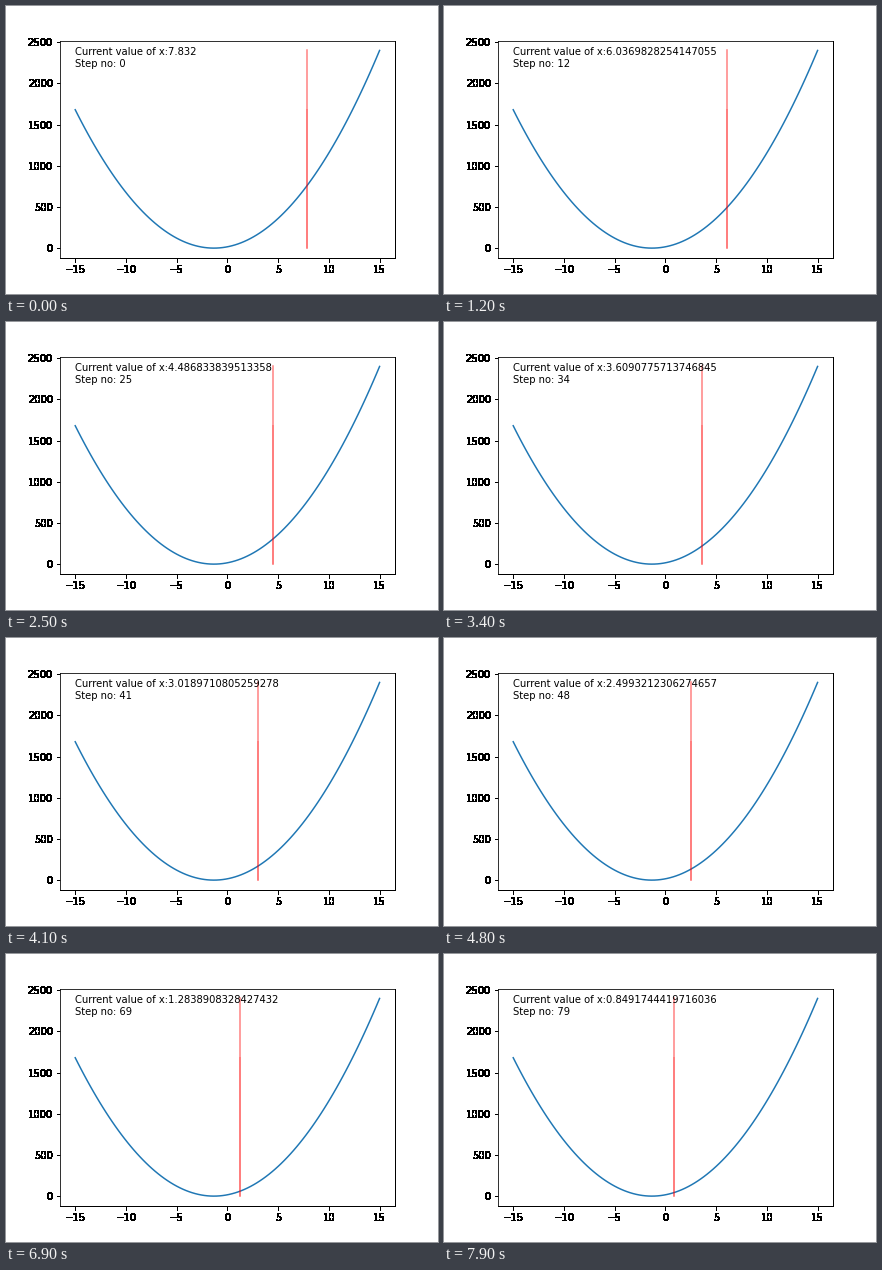
These frames come from a looping animation (432x288 px, 8 s). A matplotlib script:

```python
import matplotlib.pyplot as plt
import numpy as np
from matplotlib.animation import FuncAnimation

STEPS = 80
RATE = 0.001


def cost(x):
    return 9 * x**2 + 24 * x + 16


def slope(x):
    return 18 * x + 24


def descend(x, steps):
    path = [x]
    for _ in range(steps - 1):
        x = x - RATE * slope(x)
        path.append(x)
    return path


def harden(img, dpi):
    """Make every touched pixel opaque, so text outside the plot has hard edges."""
    img = np.rint(img * 255).astype(np.uint8)
    img[..., 3] = np.where(img[..., 3] > 0, 255, 0)
    return img, 0, 0


plt.rcParams.update({"font.family": "DejaVu Sans", "font.size": 10})
fig = plt.figure(figsize=(6, 4), dpi=72, facecolor="white")
fig.subplots_adjust(left=0.125, right=0.9, bottom=0.125, top=0.88)
ax = fig.add_subplot()
ax.set_agg_filter(harden)

xs = np.linspace(-15, 15, 100)
ys = cost(xs)
ax.plot(xs, ys)
ax.set_xticks(range(-15, 16, 5))
ax.set_yticks(range(0, 2501, 500))
ax.set_xlim(-16.5, 16.5)
ax.set_ylim(-120.05, 2521.05)

# The marker runs down and back up through the curve's heights.
marker, = ax.plot(np.full_like(xs, 0), ys, color="red", alpha=0.5)
label = ax.text(-15, 2200, "")
values = descend(7.832, STEPS)


def update(step):
    x = values[step]
    marker.set_xdata(np.full_like(xs, x))
    label.set_text(f"Current value of x:{x}\nStep no: {step}")
    return marker, label


anim = FuncAnimation(fig, update, frames=STEPS, interval=100,
                     repeat=True, repeat_delay=0, blit=False)
plt.show()
```
